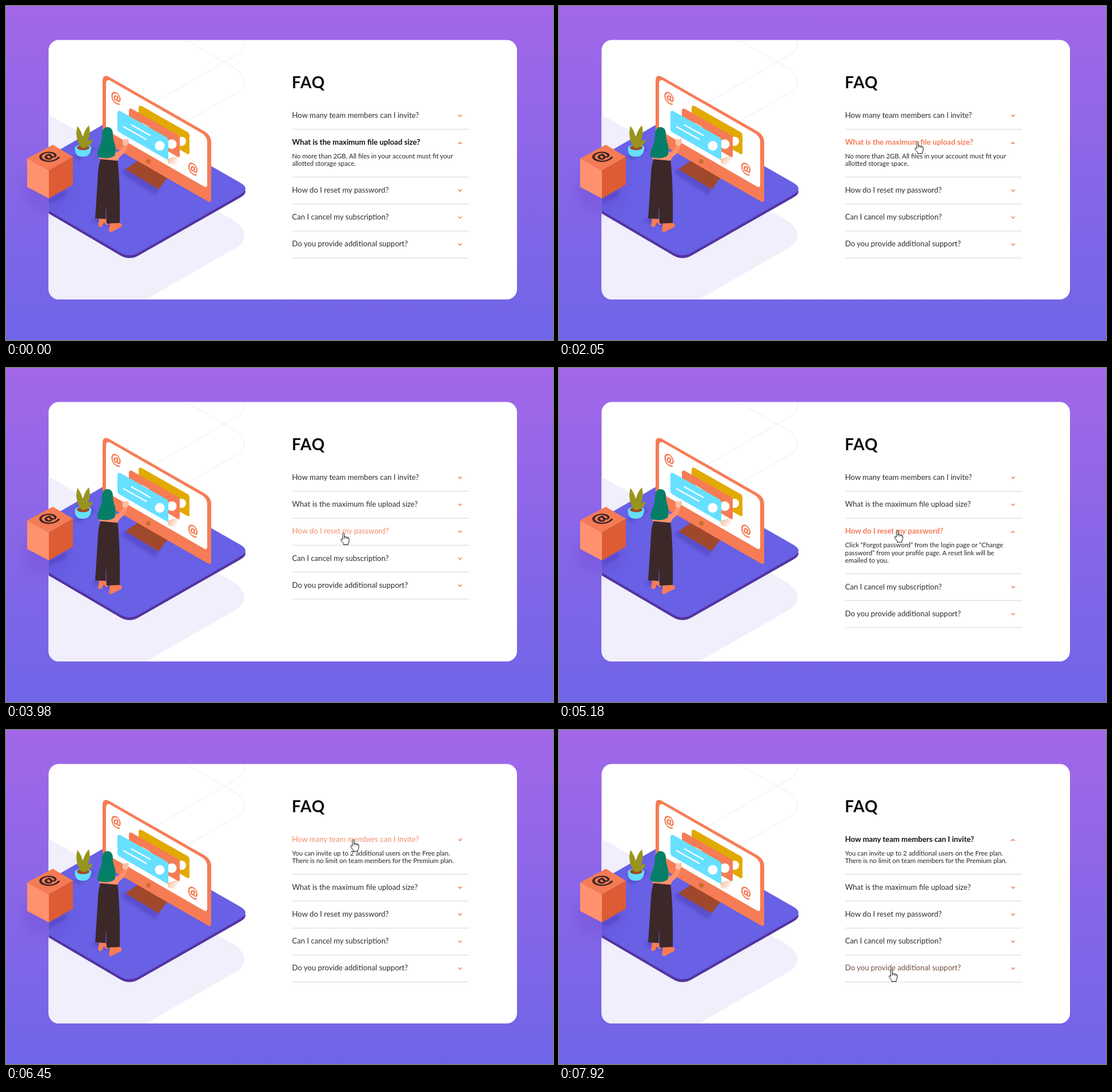
An HTML page that plays this animation: 957x585 px, repeating every 7990 ms.

```html
<!DOCTYPE html>
<html lang="en">
<head>
<meta charset="utf-8">
<title>FAQ</title>
<style>
html, body { margin: 0; width: 100%; height: 100%; overflow: hidden; }
svg { display: block; width: 100vw; height: 100vh; }
text { font-family: Lato, "Open Sans", sans-serif; }
.title { font-size: 13.15px; fill-opacity: .88; }
.title.bold { font-size: 13.2px; font-weight: 700; fill-opacity: 1; }
.answer { font-size: 11.4px; fill: #24232e; }
.heading { font-size: 28px; font-weight: 700; letter-spacing: .8px; fill: #08070d; }
.at { font-weight: 900; text-anchor: middle; }
</style>
</head>
<body>
<svg viewBox="0 0 957 585">
  <defs>
    <linearGradient id="sky" x2="0" y2="1"><stop stop-color="#a367e9"/><stop offset="1" stop-color="#6f65e7"/></linearGradient>
    <linearGradient id="glow" x2="1" y2=".6"><stop stop-color="#f2b184"/><stop offset="1" stop-color="#fff"/></linearGradient>
    <filter id="soft" x="-50%" y="-50%" width="200%" height="200%"><feGaussianBlur stdDeviation="11"/></filter>
    <filter id="blur" x="-50%" y="-50%" width="200%" height="200%"><feGaussianBlur stdDeviation="2.5"/></filter>
    <clipPath id="inside"><rect x="74.500" y="59.500" width="819.500" height="454.500" rx="18"/></clipPath>
    <path id="board" d="M74 263L201 190L409 309Q429 320 409 331L232 432Q216 441 200 432L74 358Z"/>
    <path id="tile" d="M195 188Q195 182 200 184L281 230Q284 232 284 235V266Q284 270 280 268L198 221Q195 219 195 216Z"/>
  </defs>
  <rect width="957" height="585" fill="url(#sky)"/>
  <g clip-path="url(#inside)">
    <rect x="74" y="59" width="821" height="456" fill="#fff"/>
    <path d="M74 190L396 374Q417 387 417 402T396 427L243 515H74Z" fill="#f0effb"/>
    <g fill="none" stroke="#ebebee">
      <path d="M315 60L397 107Q417 118 417 134Q417 144 405 151L255 237"/>
      <path d="M417.500 60V66Q417 77 406 84L250 175"/>
    </g>
    <use href="#board" y="5" fill="#5533a0"/>
    <use href="#board" fill="#6860e5"/>
    <g fill="#4e41b5" filter="url(#blur)" opacity=".55">
      <path d="M200 291L212 284L268 319L261 331Z"/>
      <path d="M118 264L150 246L156 250L127 270Z"/>
      <path d="M75 337L105 322V331L75 346Z"/>
      <path d="M148 377L175 362L187 387Z"/>
    </g>
  </g>

  <ellipse cx="70" cy="325" rx="42" ry="36" fill="#5b35bc" opacity=".2" filter="url(#soft)"/>
  <path d="M37 267L75 288V337L37 317Z" fill="#ff916e"/>
  <path d="M75 288L117 264V313L75 337Z" fill="#dd5c34"/>
  <path d="M82 243L117 264L75 288L37 267Z" fill="#f57b54"/>
  <text class="at" transform="matrix(.86 -.43 .8 .43 76 265)" y="9" font-size="36" fill="#3b2526">@</text>

  <path d="M121 248Q119 264 134 264T149 248Z" fill="#65dffb"/>
  <ellipse cx="135" cy="249" rx="14.500" ry="6.500" fill="#65dffb"/>
  <ellipse cx="135" cy="248" rx="11" ry="4.500" fill="#a14a2b"/>
  <g fill="#98951d">
    <path d="M132 248Q119 231 125 210Q138 227 134 248Z"/>
    <path d="M133 248Q132 223 145 209Q151 232 135 248Z"/>
    <path d="M133 248Q140 235 152 234Q148 247 135 249Z"/>
  </g>

  <path d="M209 286L232 270L283 300L267 321Z" fill="#a0482b"/>
  <path d="M169 131Q169 119 180 124L348 220Q359 227 359 238V340Q358 346 351 341L172 238Q169 236 169 232Z" fill="#f67c55"/>
  <path d="M175 137Q175 127 183 131L343 223Q352 229 352 238V314Q351 319 346 316L178 219Q175 217 175 213Z" fill="#fff"/>
  <circle cx="249" cy="272" r="4" fill="#c96d2d"/>
  <path d="M282 268L304 261L296 279L284 276Z" fill="url(#glow)"/>
  <use href="#tile" x="37" y="-9" fill="#e2aa00"/>
  <circle cx="307" cy="237" r="8" fill="#fff"/>
  <path d="M255 203L278 216" stroke="#fff" stroke-width="2.500"/>
  <use href="#tile" x="20" y="-4" fill="#f67c55"/>
  <circle cx="290" cy="242" r="8.500" fill="#fff"/>
  <path d="M238 206L250 213" stroke="#fff" stroke-width="2.500"/>
  <use href="#tile" fill="#67e0ff"/>
  <circle cx="269" cy="245" r="8.500" fill="#fff"/>
  <path d="M205 211L246 234M219 208L253 227" stroke="#fff" stroke-width="2.200"/>
  <g fill="#f67c55" font-size="25">
    <text class="at" transform="matrix(.84 .42 0 1 192.500 162)" y="6.500">@</text>
    <text class="at" transform="matrix(.84 .42 0 1 327 286)" y="6.500">@</text>
  </g>

  <path d="M163 372L161 385Q166 390 169 384L171 379L176 384Q180 384 177 379L174 372Z" fill="#f67c55"/>
  <path d="M182 378L180 394Q184 398 188 394L202 387Q205 381 198 380Z" fill="#f67c55"/>
  <path d="M166 267H195Q200 312 199 380L176 381L175 347L174 373L156 372Q159 327 161 293Q162 276 166 267Z" fill="#3c2828"/>
  <path d="M163 268Q165 240 177 234Q190 235 193 257L202 251L206 242L212 244Q211 256 199 264L195 271Z" fill="#ff916e"/>
  <path d="M204 243V236Q208 231 210 234L214 232L215 239L211 245Z" fill="#fac0a4"/>
  <path d="M168 224Q169 212 178 212Q188 213 187 228Q188 235 191 244Q193 254 190 262Q181 269 162 265Q158 261 162 250Q168 239 168 224Z" fill="#057e68"/>

  <text class="heading" x="500" y="144">FAQ</text>
  <g id="list"></g>
  <g id="cursor" stroke="#111" stroke-linejoin="round">
    <path id="arrow" d="M.5 .5V16L4 12.700L6.500 18.200L9 17L6.500 11.800H11Z" fill="#fff"/>
    <path id="hand" d="M-2 11.500V1.500Q-2 0-.5 0T1 1.500V7Q3 5 4 7.500Q6 5.800 6.700 8.200Q9.200 7.500 9.200 10V14Q9.200 16 7.500 18V20.500H-.5V18.500L-5 12.500Q-5.300 10-3.500 10.500ZM1 6V10M4 7.500V10M6.700 8.200V10.500" fill="#fff"/>
  </g>
</svg>
<script>
const LOOP = 7990, STEP = 10, PITCH = 47.2;
const faq = [
  ["How many team members can I invite?",
    "You can invite up to 2 additional users on the Free plan.",
    "There is no limit on team members for the Premium plan."],
  ["What is the maximum file upload size?",
    "No more than 2GB. All files in your account must fit your",
    "allotted storage space."],
  ["How do I reset my password?",
    "Click “Forgot password” from the login page or “Change",
    "password” from your profile page. A reset link will be",
    "emailed to you."],
  ["Can I cancel my subscription?"],
  ["Do you provide additional support?"]
];
// [time, open row]
const clicks = [[-1000, 1], [2990, -1], [4320, 2], [6380, 0]];
// [time, x, y] of the pointer tip
const path = [
  [850, 930, 572], [1390, 628, 304], [1590, 609, 250], [1650, 608, 249],
  [1730, 608, 249], [2050, 628, 238], [3400, 628, 238], [3850, 591, 289],
  [4320, 591, 289], [4500, 592, 286], [5120, 592, 286], [5970, 608, 195],
  [6240, 608, 192], [7060, 608, 192], [7840, 583, 412], [7920, 582.5, 420], [LOOP, 582.5, 420]
];

const clamp = v => Math.min(1, Math.max(0, v));
const $ = id => document.getElementById(id);

function el(parent, tag, attrs, text = "") {
  const node = document.createElementNS("http://www.w3.org/2000/svg", tag);
  for (const key in attrs) node.setAttribute(key, attrs[key]);
  node.textContent = text;
  return parent.appendChild(node);
}

const slope = (i, k) => (path[i + 1][k] - path[i][k]) / (path[i + 1][0] - path[i][0]);

function tangent(i, k) {
  if (i === path.length - 1) return 0;
  if (!i) return slope(0, k);
  const a = slope(i - 1, k), b = slope(i, k);
  return a * b > 0 ? 2 * a * b / (a + b) : 0;
}

// Monotone cubic through the pointer path
function pointer(t) {
  let i = 0;
  while (i < path.length - 2 && t >= path[i + 1][0]) i++;
  const h = path[i + 1][0] - path[i][0], u = clamp((t - path[i][0]) / h), v = 1 - u;
  return [1, 2].map(k =>
    path[i][k] * v * v * (1 + 2 * u) + path[i + 1][k] * u * u * (3 - 2 * u) +
    h * u * v * (tangent(i, k) * v - tangent(i + 1, k) * u));
}

function stateAt(t) {
  const n = clicks.filter(c => c[0] <= t).length - 1;
  return { open: clicks[n][1], last: n ? clicks[n - 1][1] : -1, age: t - clicks[n][0] };
}

const extra = i => i < 0 ? 0 : 10 + 13.3 * (faq[i].length - 1);
const rowY = (i, open) => 192 + PITCH * i + (open < i ? extra(open) : 0);

function hovered(t) {
  if (t < 850) return -1;
  const y = pointer(t)[1], { open } = stateAt(t);
  return faq.findIndex((_, i) => Math.abs(y - rowY(i, open) - 1) < 8.5);
}

// Hover strength of each row, sampled over the loop
const heat = [faq.map(() => 0)];
for (let t = STEP; t <= LOOP; t += STEP) {
  const hot = hovered(t);
  heat.push(heat.at(-1).map((v, i) => clamp(v + (i === hot ? STEP : -STEP) / 250)));
}

const rows = faq.map(([title, ...lines]) => {
  const g = el($("list"), "g", {});
  const row = {
    g,
    title: el(g, "text", { x: 500.5, y: 4 }, title),
    arrow: el(g, "path", { d: "M-3-1.6L0 1.4L3-1.6", fill: "none", stroke: "#f47b56", "stroke-width": 1.5 }),
    rule: el(g, "path", { d: "M501 0H810", stroke: "#d5d5da" }),
    answer: el(g, "g", {})
  };
  lines.forEach((s, n) => el(row.answer, "text", { class: "answer", x: 500.5, y: 28 + 13.3 * n }, s));
  return row;
});

function mix(k) {
  const e = k * k * (3 - 2 * k);
  return `rgb(${[[17, 244], [16, 123], [24, 86]].map(([a, b]) => Math.round(a + (b - a) * e))})`;
}

function draw(t) {
  const { open, last, age } = stateAt(t);
  rows.forEach((r, i) => {
    const isOpen = i === open;
    const bold = isOpen ? age >= 130 : i === last && age < 65;
    const turn = isOpen ? clamp(age / 300) : 0;
    r.g.setAttribute("transform", `translate(0 ${rowY(i, open)})`);
    r.title.setAttribute("class", bold ? "title bold" : "title");
    r.title.setAttribute("fill", mix(heat[Math.floor(t / STEP)][i]));
    r.arrow.setAttribute("transform", `translate(${794.5 - turn * .5} ${.2 + turn * .6}) rotate(${-180 * turn * turn * (3 - 2 * turn)})`);
    r.rule.setAttribute("transform", `translate(0 ${24 + (isOpen ? extra(i) : 0)})`);
    r.answer.setAttribute("visibility", isOpen ? "visible" : "hidden");
  });
  const over = hovered(t) >= 0;
  $("cursor").setAttribute("transform", `translate(${pointer(t)})`);
  $("cursor").setAttribute("display", t < 850 ? "none" : "inline");
  $("arrow").setAttribute("display", over ? "none" : "inline");
  $("hand").setAttribute("display", over ? "inline" : "none");
}

const start = performance.now();
function tick() {
  draw((performance.now() - start) % LOOP);
  requestAnimationFrame(tick);
}
tick();
</script>
</body>
</html>
```
